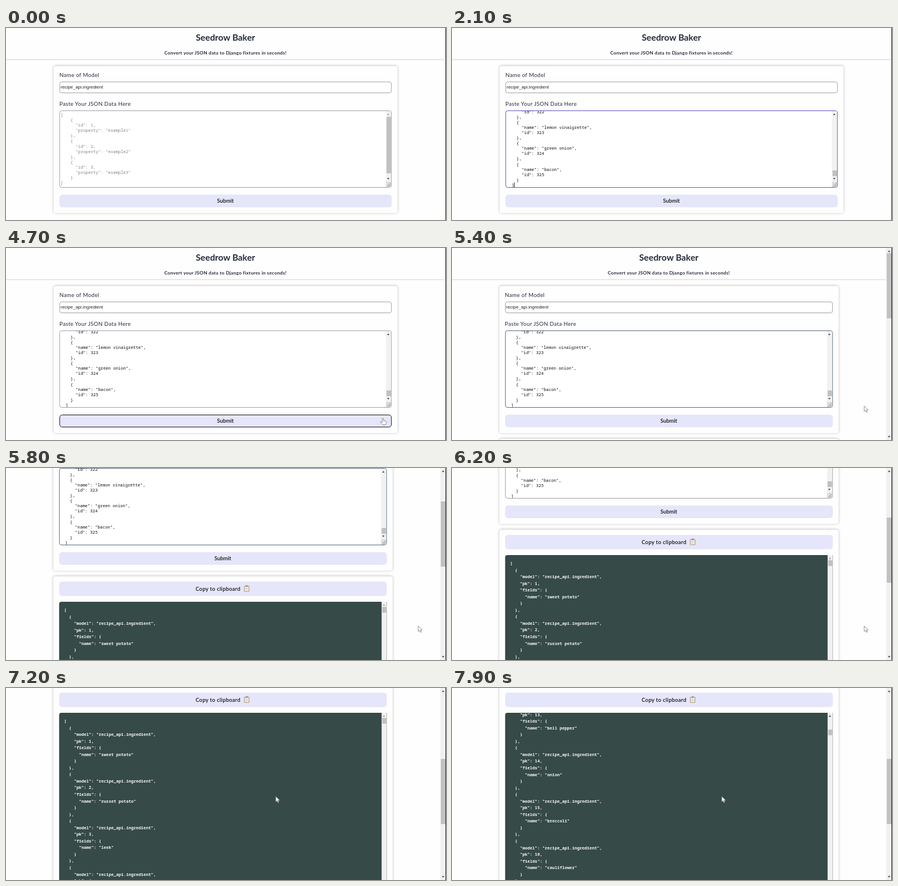
Write an HTML page that moves like this. It is 760 px wide and 333 px high and loops after 8 s.

```html
<!DOCTYPE html>
<html lang="en">
<head>
<meta charset="utf-8">
<title>Seedrow Baker</title>
<style>
  html, body { margin: 0; width: 100%; height: 100%; overflow: hidden; background: #fefefe; }
  #stage { position: relative; width: 760px; height: 333px; overflow: hidden; font-family: Lato, sans-serif; color: #252b3b; }
  #stage div, #stage pre, #stage svg { position: absolute; box-sizing: border-box; margin: 0; }
  #page { left: 0; top: 0; height: 928px; }
  .line { left: 0; width: 100%; text-align: center; font-weight: 700; white-space: nowrap; }
  #header { left: 0; top: 0; width: 100%; height: 54px; box-shadow: 0 1px 2px #d2d2d4; }
  #title { top: 4px; font-size: 15.3px; line-height: 25px; }
  #tagline { top: 36px; font-size: 8.2px; line-height: 15px; letter-spacing: .25px; }
  .card { left: 50%; width: 78.3%; transform: translateX(-50%); border-radius: 4px; background: #fefefe; box-shadow: 0 -.5px 4px #bbb; }
  .card > * { left: 10px; right: 10px; }
  .label { font-size: 9.5px; line-height: 14px; letter-spacing: .33px; white-space: nowrap; }
  .field { border: 1px solid #a2a2a2; border-radius: 4px; background: #fff; overflow: hidden; }
  #model { top: 27px; height: 20px; padding-left: 1px; font: 7.9px/18px "Liberation Sans", sans-serif; color: #222; }
  #area { top: 77px; height: 134px; }
  pre { font-family: "Noto Sans Mono", monospace; }
  #area pre { left: 1px; font-size: 7.22px; line-height: 9.09px; }
  #hint { top: 2px; color: #858585; }
  #pasted { bottom: -1px; color: #111; font-weight: 500; }
  #caret { width: 1px; height: 9px; background: #111; }
  .button { border-radius: 5px; background: #e6e6fa; color: #111; text-align: center; font-size: 9.3px; font-weight: 600; }
  #submit { top: 223px; height: 22px; line-height: 20px; border: 1px solid #e6e6fa; }
  #copy { top: 9px; height: 25px; line-height: 26px; letter-spacing: .3px; }
  #copy svg { position: static !important; vertical-align: -2px; margin-left: 3px !important; }
  #output { top: 44px; height: 533px; border-radius: 4px 0 0 4px; background: #364a48; overflow: hidden; }
  #output pre { left: 9px; top: 9px; font-size: 7.15px; line-height: 11.54px; font-weight: 600; color: #f4f6f5; }
  .bar { width: 9px; right: 0; top: 0; background: #f1f1f1; }
  .bar::before, .bar::after { content: ""; position: absolute; left: 2.5px; border: 2px solid transparent; }
  .bar::before { top: 4px; border-bottom: 3px solid var(--up, #505050); border-top: 0; }
  .bar::after { bottom: 4px; border-top: 3px solid #505050; border-bottom: 0; }
  .thumb { left: 1px; width: 8px; background: #c1c1c1; }
  #grip { right: 0; bottom: 0; width: 9px; height: 9px; background: #ddd; }
  #edge { right: 0; top: 0; width: 1px; height: 100%; background: #2a2a2a; }
  #pointer { left: 0; top: 0; overflow: visible; }
</style>
</head>
<body>
<div id="stage">
  <div id="page">
    <div id="header">
      <div class="line" id="title">Seedrow Baker</div>
      <div class="line" id="tagline">Convert your JSON data to Django fixtures in seconds!</div>
    </div>
    <div class="card" style="top:66px;height:255px">
      <div class="label" style="top:9px">Name of Model</div>
      <div class="field" id="model">recipe_api.ingredient</div>
      <div class="label" style="top:59px">Paste Your JSON Data Here</div>
      <div class="field" id="area">
        <pre id="hint"></pre>
        <pre id="pasted"></pre>
        <div id="caret"></div>
        <div class="bar" id="areaBar" style="height:123px"><div class="thumb"></div></div>
        <div id="grip"><svg width="9" height="9"><path d="M2 8L8 2M5 8L8 5" stroke="#777" stroke-width=".8"/></svg></div>
      </div>
      <div class="button" id="submit">Submit</div>
    </div>
    <div class="card" id="result" style="top:331px;height:587px">
      <div class="button" id="copy">Copy to clipboard <svg width="11" height="12" viewBox="0 0 11 12"><rect x=".5" y="1.5" width="9" height="10" rx="1" fill="#a98f6b"/><rect x="1.5" y="2.5" width="7" height="8" fill="#f3f3ee"/><rect x="3" y=".5" width="4" height="2.4" rx=".6" fill="#8b9097"/><path d="M3 5H7M3 6.7H7M3 8.4H6" stroke="#a8adb2" stroke-width=".6"/></svg></div>
      <div id="output">
        <pre id="fixtures"></pre>
        <div class="bar" id="outBar" style="height:100%"><div class="thumb" style="height:10px"></div></div>
      </div>
    </div>
  </div>
  <div class="bar" id="pageBar" style="right:1px;height:100%"><div class="thumb" style="height:113px"></div></div>
  <div id="edge"></div>
  <svg id="pointer" width="14" height="16"><path stroke-width=".8" stroke-linejoin="round"/></svg>
</div>
<script>
const LOOP = 8000, STEP = 100;
const PASTE = 2100, FOCUS = 1000, CLICK = 4700, RESULT = 5000;
const $ = id => document.getElementById(id);
const thumbOf = id => $(id).querySelector('.thumb');

const SHAPES = {
  arrow: 'M0 0V9.5L2.2 7.5L3.8 11L5.4 10.3L3.9 7H6.8Z',
  hand: 'M0 0.8Q1 -.4 2 .8V4.5L6 5.4Q7.3 5.8 7 7.5L6 11.5H.5L-3.2 7.5Q-3.4 6 -2 6.2L0 7.8Z',
  beam: 'M-1.5 -4.5H1.5M0 -4.5V4.5M-1.5 4.5H1.5'
};

// Each row: time, then values
const pageScroll = [[5500, 0], [5600, 40], [5700, 100], [5800, 143], [6000, 180], [6200, 224], [6400, 297], [6500, 317], [6700, 332]];
const outScroll = [[7300, 0], [7400, 100], [7800, 860], [7900, 1016]];
const pointerPath = [[3100, 500, 215], [3500, 712, 290], [3800, 672, 311], [4100, 672, 311], [4500, 650, 295],
  [4900, 650, 295], [5400, 712, 274], [6900, 712, 274], [7200, 466, 188]];
const caretOn = [[1000, 1500], [2000, 2700], [3200, 3700], [4200, 4700]];

function at(rows, t) {
  const next = rows.findIndex(row => row[0] > t);
  if (next === 0) return rows[0].slice(1);
  if (next < 0) return rows[rows.length - 1].slice(1);
  const a = rows[next - 1], b = rows[next], k = (t - a[0]) / (b[0] - a[0]);
  return a.slice(1).map((v, i) => v + (b[i + 1] - v) * k);
}

const ids = [1, 2, 3];
$('hint').textContent = '[\n' + ids.map(n =>
  `    {\n      "id": ${n},\n      "property": "example${n}"\n    }`).join(',\n') + '\n]';

const lastItems = ['red cabbage', 'lemon vinaigrette', 'green onion', 'bacon'];
$('pasted').textContent = lastItems.map((name, i) =>
  `    {\n      "name": "${name}",\n      "id": ${322 + i}\n    }`).join(',\n') + '\n  ]';

const foods = ['sweet potato', 'russet potato', 'leek', 'carrot', 'celery', 'garlic', 'tomato', 'spinach', 'kale', 'zucchini',
  'cucumber', 'mushroom', 'bell pepper', 'onion', 'broccoli', 'cauliflower', 'asparagus', 'corn', 'radish', 'beet'];
$('fixtures').textContent = '[\n' + foods.map((name, i) =>
  `  {\n    "model": "recipe_api.ingredient",\n    "pk": ${i + 1},\n    "fields": {\n      "name": "${name}"\n    }\n  }`).join(',\n');

function show(el, visible) { el.style.visibility = visible ? 'visible' : 'hidden'; }

function drawPointer(t) {
  const [x, y] = at(pointerPath, t);
  const hover = t < RESULT + STEP && x < 667 && y > 288 && t >= 3800;
  const overText = t < 3800 && x < 656;
  const path = $('pointer').firstChild;
  path.setAttribute('d', hover ? SHAPES.hand : overText ? SHAPES.beam : SHAPES.arrow);
  path.setAttribute('fill', '#fff');
  path.setAttribute('stroke', overText ? '#222' : '#777');
  $('pointer').style.transform = `translate(${x}px, ${y}px)`;
  show($('pointer'), t >= 3200);
  $('submit').style.borderColor = hover ? '#15151c' : '#e6e6fa';
}

function render(t) {
  const pasted = t >= PASTE, done = t >= RESULT;
  const [scroll] = at(pageScroll, t), [inner] = at(outScroll, t);

  $('page').style.width = (done ? 749 : 758) + 'px';
  $('page').style.transform = `translateY(${-scroll}px)`;
  $('result').style.display = $('pageBar').style.display = done ? '' : 'none';
  thumbOf('pageBar').style.top = 9 + scroll * 0.343 + 'px';

  show($('hint'), !pasted);
  show($('pasted'), pasted);
  const focused = t >= FOCUS && t < CLICK;
  $('area').style.borderColor = focused ? '#6257c2' : done && t < 6000 ? '#5a6b7d' : '#a2a2a2';
  $('areaBar').style.setProperty('--up', pasted ? '#505050' : '#a3a3a3');
  Object.assign(thumbOf('areaBar').style, pasted ? { top: '103px', height: '10px' } : { top: '10px', height: '98px' });
  Object.assign($('caret').style, pasted ? { left: '14px', top: '124px' } : { left: '1px', top: '2px' });
  show($('caret'), caretOn.some(([a, b]) => t >= a && t < b));

  $('fixtures').style.transform = `translateY(${-inner}px)`;
  $('outBar').style.setProperty('--up', inner ? '#505050' : '#a3a3a3');
  thumbOf('outBar').style.top = 9 + inner * 0.0192 + 'px';
  drawPointer(t);
}

const start = performance.now();
function tick() {
  const t = (performance.now() - start) % LOOP;
  render(Math.floor(t / STEP) * STEP);
  requestAnimationFrame(tick);
}
tick();
</script>
</body>
</html>
```
